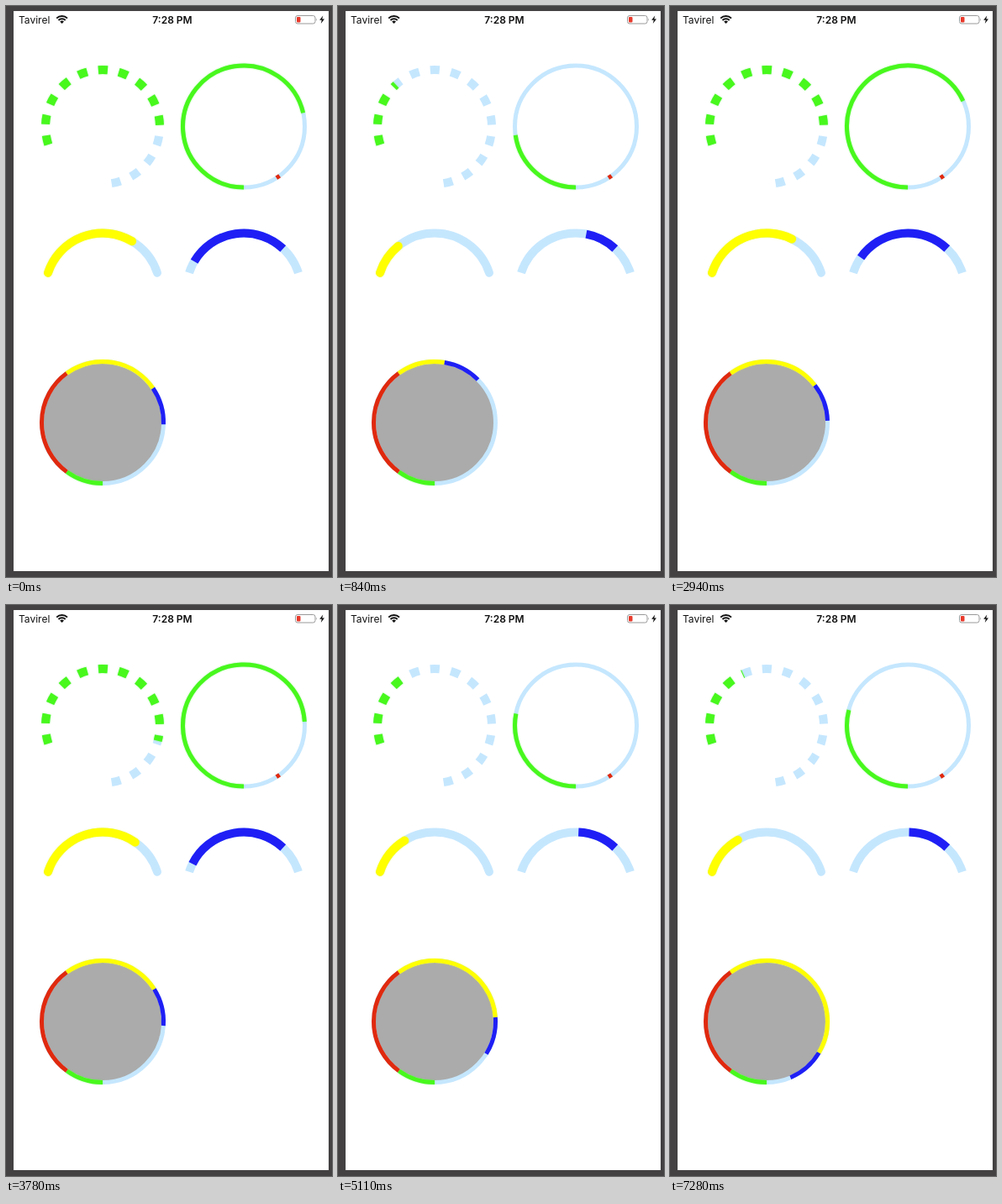
An HTML page that plays this animation: 388x680 px, repeating every 7350 ms.

```html
<!DOCTYPE html>
<html lang="en">
<head>
<meta charset="utf-8">
<title>Progress rings</title>
<style>
  html, body { margin: 0; width: 100%; height: 100%; overflow: hidden; background: #434141; }
  svg { display: block; width: 100%; height: 100%; }
  text { font: 12px Inter, Roboto, sans-serif; fill: #111; }
  .time { font-weight: 600; text-anchor: middle; }
  .arc { fill: none; }
  .glow-green { filter: drop-shadow(0 0 1px rgba(76, 250, 30, .4)); }
  .glow-yellow { filter: drop-shadow(0 0 1px rgba(255, 255, 0, .4)); }
</style>
</head>
<body>
<svg id="stage" viewBox="0 0 388 680">
  <rect width="388" height="680" fill="#434141"/>
  <rect x="9" y="6" width="375" height="667" fill="#fff"/>

  <text x="15" y="20.5">Tavirel</text>
  <text class="time" x="198" y="20.5">7:28 PM</text>
  <g fill="none" stroke="#111" stroke-width="2">
    <path d="M60.2 14.6a9 9 0 0 1 12.8 0"/>
    <path d="M62.5 17a5.8 5.8 0 0 1 8.2 0"/>
  </g>
  <path d="M64.2 18.6a3.4 3.4 0 0 1 4.8 0l-2.4 2.4z" fill="#111"/>
  <rect x="344.5" y="11.5" width="23.5" height="9.5" rx="2.5" fill="none" stroke="#999"/>
  <rect x="346" y="13" width="4.5" height="6.5" rx="1" fill="#e8392b"/>
  <path d="M369 14.5q1.6 1.7 0 3.5z" fill="#999"/>
  <path d="M377.2 11.5l-4 5.2h2.6l-1 4.3 4.2-5.6h-2.7z" fill="#111"/>
</svg>
<script>
const LOOP = 7350;
const EASE_MS = 355;
const FIRST = 560;
const PERIOD = 2100;
const LEVELS = [.714, .171, .74, .281, .291];
const SPLITS = [.655, .511, .661, .739, .836];

const TRACK = '#c5e7fe', GREEN = '#48f81c', YELLOW = '#ffff00';
const BLUE = '#1f1ff5', RED = '#e0290e', GRAY = '#ababab';

const stage = document.getElementById('stage');

function add(name, attrs) {
  const el = document.createElementNS(stage.namespaceURI, name);
  for (const key in attrs) el.setAttribute(key, attrs[key]);
  stage.append(el);
  return el;
}

// Angles in degrees, clockwise from three o'clock.
function arcPath({ x, y, r }, from, to) {
  const point = deg => {
    const a = deg * Math.PI / 180;
    return `${(x + r * Math.cos(a)).toFixed(3)} ${(y + r * Math.sin(a)).toFixed(3)}`;
  };
  return `M${point(from)}A${r} ${r} 0 ${to - from > 180 ? 1 : 0} 1 ${point(to)}`;
}

function arc(ring, color, from, to, extra = {}) {
  const el = add('path', { class: 'arc', stroke: color, 'stroke-width': ring.w, ...extra });
  const set = (a, b) => el.setAttribute('d', arcPath(ring, a, b));
  set(from, to);
  return set;
}

const circle = ({ x, y, r, w }, fill = 'none') =>
  add('circle', { cx: x, cy: y, r, fill, stroke: TRACK, 'stroke-width': w });

const dashed = { x: 115, y: 144, r: 68, w: 10 };
const full = { x: 283, y: 143.5, r: 72.5, w: 5 };
const rounded = { x: 115, y: 338.8, r: 68.3, w: 10 };
const reversed = { x: 283, y: 338.8, r: 68.3, w: 10 };
const multi = { x: 115, y: 496, r: 72.5, w: 5 };

const dash = { 'stroke-dasharray': '11.04 13.53' };
const round = { 'stroke-linecap': 'round' };
const green = { class: 'arc glow-green' };
const yellow = { class: 'arc glow-yellow' };

arc(dashed, TRACK, 162, 450, dash);
const setDashed = arc(dashed, GREEN, 162, 163, { ...dash, ...green });

circle(full);
const setFull = arc(full, GREEN, 90, 91, green);
arc(full, RED, 54, 57.6);

arc(rounded, TRACK, 198, 342, round);
const setRounded = arc(rounded, YELLOW, 198, 199, { ...round, ...yellow });

arc(reversed, TRACK, 198, 342);
const setReversed = arc(reversed, BLUE, 312, 313.2);

circle(multi, GRAY);
arc(multi, GREEN, 90, 126, green);
arc(multi, RED, 126, 234);
const setYellow = arc(multi, YELLOW, 234, 235, yellow);
const setBlue = arc(multi, BLUE, 235, 271);

function valueAt(values, t) {
  const i = Math.floor((t - FIRST) / PERIOD);
  if (i < 0) return values[0];
  const k = Math.min((t - FIRST - i * PERIOD) / EASE_MS, 1);
  const eased = (1 - Math.cos(Math.PI * k)) / 2;
  return values[i] + (values[i + 1] - values[i]) * eased;
}

function render(t) {
  const level = valueAt(LEVELS, t);
  const split = 90 + 360 * valueAt(SPLITS, t);
  setDashed(162, 162 + 288 * level);
  setFull(90, 90 + 360 * level);
  setRounded(198, 198 + 144 * level);
  setReversed(313.2 - 144 * level, 313.2);
  setYellow(234, split);
  setBlue(split, split + 36);
}

const start = performance.now();
function tick() {
  render((performance.now() - start) % LOOP);
  requestAnimationFrame(tick);
}
tick();
</script>
</body>
</html>
```
